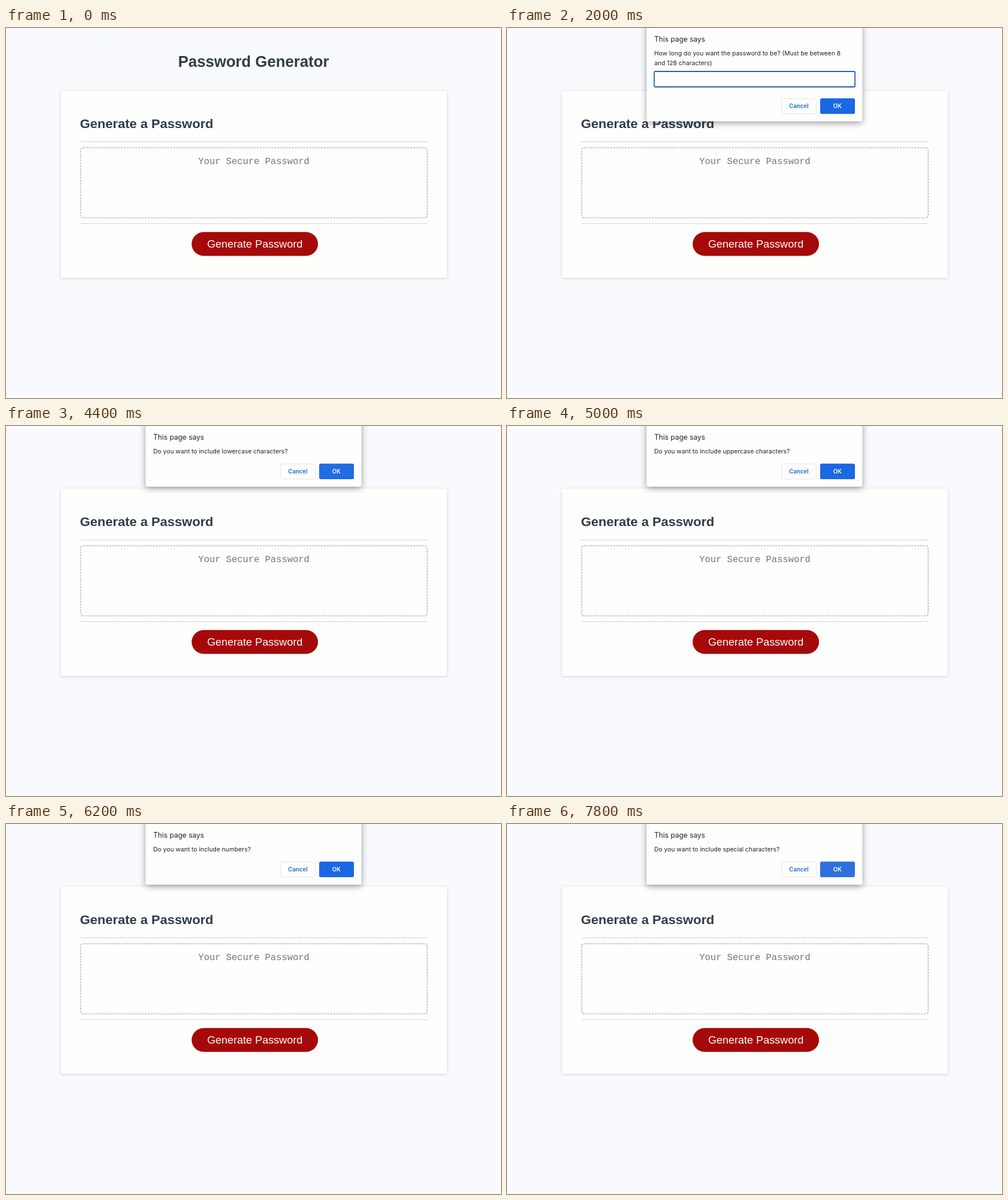
An HTML page for the animation above (8000 ms loop, 865 by 647 pixels).

```html
<!DOCTYPE html>
<html lang="en">
<head>
<meta charset="utf-8">
<title>Password Generator</title>
<style>
  html, body { margin: 0; width: 100%; height: 100%; overflow: hidden; background: #f8fafd; }
  svg { display: block; width: 865px; height: 647px; }
  .page { font-family: "Liberation Sans", Arial, sans-serif; }
  .head { font-weight: 700; fill: #303c49; }
  .mono { font: 16.19px "Liberation Mono", "Courier New", monospace; fill: #757575; }
  .dialog { font: 10.8px Inter, sans-serif; fill: #222326; }
  .label { font-size: 10.1px; font-weight: 600; }
  .mid { text-anchor: middle; }
  .card { filter: drop-shadow(0 1.5px 2.5px rgba(40, 50, 45, .2)); }
  .panel { filter: drop-shadow(0 3px 6px rgba(0, 0, 0, .38)); }
</style>
</head>
<body>
<svg viewBox="0 0 865 647">
  <rect width="865" height="647" fill="#f8fafd"/>
  <g class="page">
    <text class="head mid" x="432.6" y="68.3" font-size="26.98">Password Generator</text>
    <rect class="card" x="96" y="109.6" width="674.5" height="327.4" rx="3.5" fill="#fefefd"/>
    <text class="head" x="129.2" y="175" font-size="22.93">Generate a Password</text>
    <path d="M129.8 199.2H736.6M129.8 342.2H736.6" stroke="#e2e3e5" stroke-width="1.7"/>
    <rect x="130.5" y="209.3" width="605.5" height="122.7" rx="4.5" fill="none"
      stroke="#bdbdc9" stroke-width="1.7" stroke-dasharray="3.37 1.69"/>
    <text class="mono mid" x="433.2" y="238">Your Secure Password</text>
    <rect x="324.4" y="356.8" width="220.8" height="41.6" rx="20.8" fill="#a60909"/>
    <text class="mid" x="434.8" y="384" font-size="18.89" fill="#fff">Generate Password</text>
  </g>
  <g id="dialog" class="dialog">
    <rect id="panel" class="panel" x="244" y="-10" width="377" rx="3.5" fill="#fefefe"/>
    <text x="257.3" y="23.8" font-size="12.5">This page says</text>
    <text id="line1" x="257.3" y="48"></text>
    <g id="field">
      <text x="257.3" y="65">and 128 characters)</text>
      <rect x="257.3" y="76" width="350.8" height="27" rx="2" fill="#fefefe" stroke="#1c5fae" stroke-width="1.8"/>
      <text id="value" x="263.5" y="93.5"></text>
    </g>
    <g id="buttons" class="label mid">
      <rect x="480" y="66.3" width="60.5" height="26.4" rx="3" fill="#fefefe" stroke="#e1e4e9"/>
      <text x="510" y="82.9" fill="#1a6cca">Cancel</text>
      <rect id="ok" x="547.2" y="65.8" width="60.8" height="27.2" rx="3"/>
      <text x="577.5" y="82.9" fill="#fff">OK</text>
    </g>
  </g>
</svg>
<script>
  const LOOP = 8000, STEP = 200;
  const $ = id => document.getElementById(id);
  const ask = what => `Do you want to include ${what}?`;

  const dialogs = [
    { from: 600, to: 3200, prompt: true,
      text: 'How long do you want the password to be? (Must be between 8' },
    { from: 3800, to: 4600, text: ask('lowercase characters'), hover: 4400, tint: '#216be3' },
    { from: 4800, to: 5600, text: ask('uppercase characters') },
    { from: 6000, to: 6800, text: ask('numbers') },
    { from: 7200, to: LOOP, text: ask('special characters'), hover: 7800, tint: '#2e70de' }
  ];

  function render(ms) {
    const t = Math.floor(ms % LOOP / STEP) * STEP;
    const d = dialogs.find(d => t >= d.from && t < d.to);
    $('dialog').style.display = d ? '' : 'none';
    if (!d) return;
    $('panel').setAttribute('height', d.prompt ? 173.2 : 116);
    $('line1').textContent = d.text;
    $('field').style.display = d.prompt ? '' : 'none';
    $('value').textContent = t >= 2200 ? '12' : '';
    $('buttons').setAttribute('transform', `translate(0 ${d.prompt ? 57.2 : 0})`);
    $('ok').setAttribute('fill', t >= d.hover ? d.tint : '#1a68e4');
  }

  const start = performance.now();
  function tick() {
    render(performance.now() - start);
    requestAnimationFrame(tick);
  }
  tick();
</script>
</body>
</html>
```
